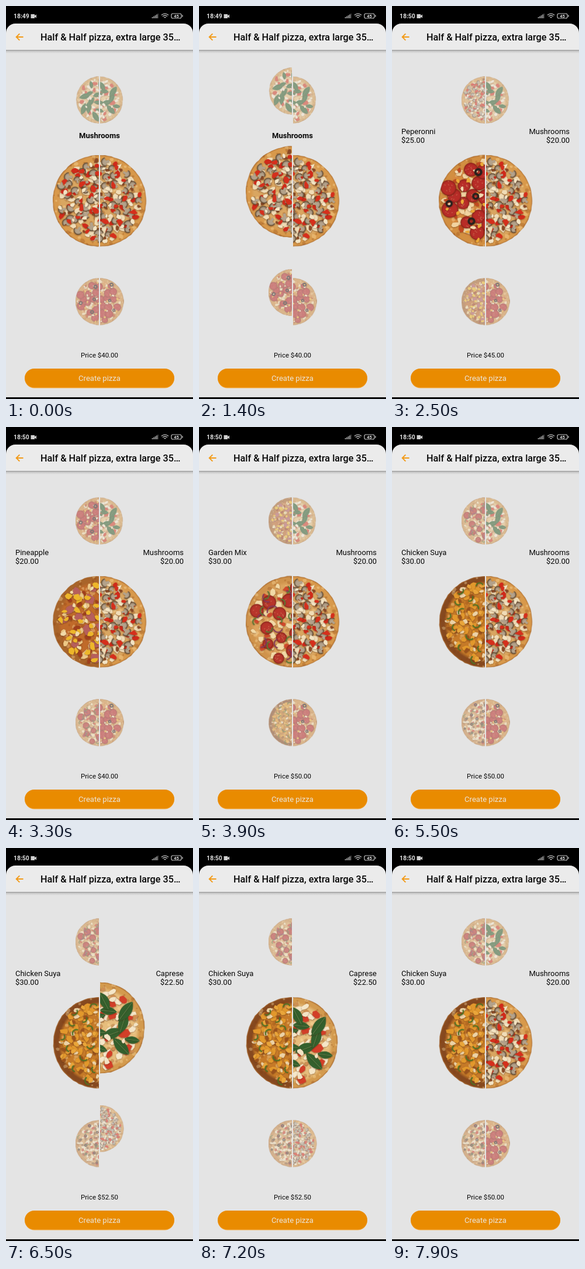
These frames come from a looping animation (320 by 672 pixels, 8000 ms). An HTML page with a canvas:

```html
<!DOCTYPE html>
<html lang="en">
<head>
<meta charset="utf-8">
<title>Half &amp; Half pizza</title>
<style>
  html, body { margin: 0; width: 100%; height: 100%; overflow: hidden; background: #e4e4e4; }
  canvas, svg { position: absolute; left: 0; top: 0; width: 320px; height: 672px; display: block; }
  text { font-family: Roboto, "Open Sans", sans-serif; fill: #050505; }
  .side { font-size: 13px; }
  .mid { text-anchor: middle; }
  .end { text-anchor: end; }
</style>
</head>
<body>
<canvas id="stage"></canvas>
<svg viewBox="0 0 320 672">
  <defs>
    <linearGradient id="shade" x1="0" y1="0" x2="0" y2="1">
      <stop offset="0" stop-color="#000" stop-opacity=".34"/>
      <stop offset=".4" stop-color="#000" stop-opacity=".12"/>
      <stop offset="1" stop-color="#000" stop-opacity="0"/>
    </linearGradient>
  </defs>

  <!-- status bar and header -->
  <rect y="75" width="320" height="6" fill="url(#shade)"/>
  <rect width="320" height="50" fill="#000"/>
  <path d="M0 75V46a16 16 0 0 1 16-16H304a16 16 0 0 1 16 16V75z" fill="#ebebeb"/>
  <text id="clock" x="13" y="21" font-size="10.4" font-weight="700" style="fill:#dedede"></text>
  <path d="M42.5 14h6.5v2.4l3-2v6.2l-3-2V21h-6.5z" fill="#d0d0d0"/>
  <g stroke="#c4c4c4" fill="none" stroke-width="1.4">
    <path d="M250.5 21v-2M253 21v-3.6M255.5 21v-5M258 21v-6.6"/>
    <path d="M260 21v-8" stroke="#555"/>
    <path d="M266 15.5q6-4.8 12 0M268 17.8q4-3.2 8 0M270.3 20q1.7-1.3 3.4 0"/>
    <rect x="283" y="13" width="17" height="8" rx="2.5" stroke-width="1.2"/>
    <path d="M302 15.5v3"/>
  </g>
  <text class="mid" x="291.5" y="20" font-size="7.5" font-weight="700" style="fill:#dedede">45</text>
  <path d="M29.5 53H18M23.3 47.3L17.6 53l5.7 5.7" fill="none" stroke="#f39a16" stroke-width="1.9"/>
  <text x="59" y="59" font-size="16.2" font-weight="500">Half &amp; Half pizza, extra large 35…</text>

  <!-- labels -->
  <text id="both" class="mid" x="160" y="226" font-size="13" font-weight="700"></text>
  <g id="pair" class="side">
    <text x="16" y="218.5"></text>
    <text x="16" y="234"></text>
    <text class="end" x="304" y="218.5"></text>
    <text class="end" x="304" y="234"></text>
  </g>
  <text id="price" class="mid" x="160" y="601" font-size="11.45"></text>

  <!-- button -->
  <rect x="32" y="620.5" width="256" height="33" rx="16.5" fill="#f5b04a"/>
  <rect x="32" y="620" width="256" height="32.5" rx="16.25" fill="#e98b00"/>
  <text class="mid" x="160" y="640.5" font-size="13.05" style="fill:#ebe6dc">Create pizza</text>
  <rect y="669" width="320" height="3" fill="#080808"/>
</svg>

<script>
const LOOP = 8000, TAU = Math.PI * 2;
const MID = 333, PAGE = 172.3, TOP = 75, BOTTOM = 592;
const $ = id => document.getElementById(id);

// Toppings: [shape, colour, count, size]
const MENU = [
  { name: 'Caprese', price: 22.5, rx: 77, crust: '#d39a4e', base: '#e6bd7c', top: [
    ['chunk', '#f5e6c8', 40, 19], ['chunk', '#d08f52', 22, 13], ['chunk', '#d23f28', 20, 20],
    ['leaf', '#34602d', 17, 36], ['chunk', '#f3e3c4', 14, 13]] },
  { name: 'Mushrooms', price: 20, rx: 80, crust: '#d8994b', base: '#d9a661', top: [
    ['chunk', '#f0dcb6', 55, 17], ['chunk', '#8a4a26', 36, 10], ['chunk', '#d02a1a', 34, 14],
    ['shroom', '#b3a28b', 58, 13], ['chunk', '#f3e4c4', 26, 10], ['chunk', '#d52f1c', 22, 13]] },
  { name: 'Peperonni', price: 25, rx: 80, crust: '#d28f41', base: '#d88a3e', top: [
    ['chunk', '#f1d3a0', 50, 17], ['chunk', '#c04a20', 34, 13], ['disc', '#b82c27', 24, 23],
    ['chunk', '#eda936', 22, 10], ['chunk', '#f3dab0', 14, 10], ['ring', '#29211e', 7, 9]] },
  { name: 'Pineapple', price: 20, rx: 80, crust: '#a8642a', base: '#c06a2a', top: [
    ['chunk', '#edc886', 50, 16], ['chunk', '#a03f1c', 34, 12], ['chunk', '#b65f5c', 24, 21],
    ['chunk', '#edb62a', 50, 14], ['chunk', '#f2dba8', 18, 10]] },
  { name: 'Garden Mix', price: 30, rx: 80, crust: '#cf934c', base: '#dda45e', top: [
    ['chunk', '#f2d9a6', 46, 17], ['chunk', '#d04a2c', 30, 13], ['disc', '#b8352b', 18, 20],
    ['arc', '#86395b', 18, 17], ['arc', '#5c7a35', 20, 15]] },
  { name: 'Chicken Suya', price: 30, rx: 79, crust: '#86491f', base: '#c67a28', top: [
    ['chunk', '#e2982c', 65, 17], ['chunk', '#9a521c', 34, 10], ['chunk', '#ecd2a6', 34, 11],
    ['chunk', '#e9a53a', 40, 12], ['arc', '#4f7424', 26, 12]] },
  { name: 'Olive Feast', price: 25, rx: 80, crust: '#c68746', base: '#d89f5c', top: [
    ['chunk', '#f2dfb8', 50, 17], ['chunk', '#cc4630', 38, 13], ['chunk', '#94663d', 28, 12],
    ['chunk', '#f2dfb8', 20, 10], ['ring', '#3a322c', 22, 7], ['arc', '#66803f', 12, 11]] }
];

// Swipes: [start ms, end ms, from page, to page]
const LEFT = [[1300, 1850, 1, 2], [2500, 2900, 2, 3], [3400, 3800, 3, 4], [3900, 4570, 4, 5]];
const RIGHT = [[6198, 6598, 1, 0], [7300, 7750, 0, 1]];

const smooth = u => { u = Math.min(1, Math.max(0, u)); return u * u * (3 - 2 * u); };
const money = n => '$' + n.toFixed(2);

function pageAt(swipes, t) {
  let page = swipes[0][2];
  for (const [a, b, from, to] of swipes) {
    if (t >= a) page = from + (to - from) * smooth((t - a) / (b - a));
  }
  return page;
}

function seeded(seed) {
  return () => {
    seed = seed * 1664525 + 1013904223 >>> 0;
    return seed / 4294967296;
  };
}

function blob(g, r, rnd, n, rough) {
  g.beginPath();
  for (let i = 0; i < n; i++) {
    const k = r * (1 - rough * rnd()), a = i / n * TAU;
    g.lineTo(Math.cos(a) * k, Math.sin(a) * k);
  }
  g.closePath();
}

const SHAPES = {
  chunk(g, r, rnd) {
    g.scale(1.15, .8);
    blob(g, r, rnd, 7, .5);
    g.fill();
  },
  disc(g, r, rnd) {
    g.beginPath();
    g.arc(0, 0, r, 0, TAU);
    g.fill();
    g.lineWidth = 2;
    g.strokeStyle = '#8f221c';
    g.stroke();
    g.fillStyle = 'rgba(240,150,110,.4)';
    for (let i = 0; i < 8; i++) {
      g.fillRect((rnd() - .5) * r * 1.2, (rnd() - .5) * r * 1.2, 5, 3);
    }
  },
  leaf(g, r) {
    g.beginPath();
    g.moveTo(-r, 0);
    g.quadraticCurveTo(-r * .1, -r * .95, r, 0);
    g.quadraticCurveTo(-r * .1, r * .85, -r, 0);
    g.fill();
    g.beginPath();
    g.moveTo(-r, 0);
    g.lineTo(r * .8, 0);
    g.lineWidth = 1.5;
    g.strokeStyle = '#6b8b55';
    g.stroke();
  },
  shroom(g, r) {
    g.beginPath();
    g.arc(0, 0, r, Math.PI, TAU);
    g.lineTo(r * .3, r * .1);
    g.lineTo(r * .3, r * .9);
    g.lineTo(-r * .3, r * .9);
    g.lineTo(-r * .3, r * .1);
    g.closePath();
    g.fill();
    g.beginPath();
    g.arc(0, 0, r, Math.PI, TAU);
    g.lineWidth = 3;
    g.strokeStyle = '#6b563d';
    g.stroke();
  },
  ring(g, r) {
    g.beginPath();
    g.arc(0, 0, r, 0, TAU);
    g.lineWidth = r * .75;
    g.stroke();
  },
  arc(g, r) {
    g.beginPath();
    g.arc(0, 0, r, 0, 2.6);
    g.lineWidth = 4;
    g.stroke();
  }
};

function bake(item, index) {
  const c = document.createElement('canvas'), g = c.getContext('2d');
  const rnd = seeded(index * 977 + 41);
  c.width = c.height = 320;
  g.translate(160, 160);
  g.scale(item.rx / 80, 1);
  blob(g, 160, rnd, 90, .012);
  g.clip();

  const dough = g.createRadialGradient(0, 0, 130, 0, 0, 160);
  dough.addColorStop(0, item.base);
  dough.addColorStop(.4, item.crust);
  dough.addColorStop(.8, item.crust);
  dough.addColorStop(1, '#a5662c');
  g.fillStyle = dough;
  g.fillRect(-160, -160, 320, 320);

  const scatter = (n, reach, draw) => {
    const turn = rnd() * TAU;
    for (let k = 0; k < n; k++) {
      const a = turn + k * 2.39996 + rnd() * .35;
      const d = reach * Math.sqrt((k + .2 + rnd() * .6) / n);
      g.save();
      g.translate(Math.cos(a) * d, Math.sin(a) * d);
      g.rotate(rnd() * TAU);
      draw();
      g.restore();
    }
  };

  // baked mottling
  scatter(190, 158, () => {
    g.fillStyle = rnd() < .5 ? 'rgba(255,225,165,.35)' : 'rgba(130,60,15,.26)';
    blob(g, 3 + rnd() * 8, rnd, 6, .5);
    g.fill();
  });
  for (const [shape, color, count, size] of item.top) {
    scatter(count, 148 - size * .6, () => {
      g.fillStyle = g.strokeStyle = color;
      g.shadowColor = 'rgba(70,30,8,.5)';
      g.shadowBlur = 4;
      g.shadowOffsetY = 1.5;
      SHAPES[shape](g, size * (.75 + rnd() * .45), rnd);
    });
  }
  return c;
}

const ratio = Math.max(1, window.devicePixelRatio || 1);
const stage = $('stage'), ctx = stage.getContext('2d');
stage.width = 320 * ratio;
stage.height = 672 * ratio;
const pies = MENU.map(bake);

function drawHalf(page, right) {
  pies.forEach((pie, i) => {
    const off = i - page, y = MID + off * PAGE;
    if (Math.abs(off) > 2) return;
    const big = smooth((.6 - Math.abs(off)) / .2);
    const w = 40.5 + 39 * big, h = 80.5 + 76.5 * big;
    ctx.globalAlpha = .55 + .45 * big;
    ctx.drawImage(pie, right ? 160 : 0, 0, 160, 320, right ? 161 : 159 - w, y - h / 2, w, h);
  });
}

function setText(el, value) {
  if (el.textContent !== value) el.textContent = value;
}

const pair = $('pair'), sides = [...pair.children];

function showLabels(l, r, t) {
  const same = l === r;
  pair.style.display = same ? 'none' : '';
  setText($('both'), same ? l.name : '');
  [l.name, money(l.price), r.name, money(r.price)].forEach((s, i) => setText(sides[i], s));
  setText($('price'), 'Price ' + money(l.price + r.price));
  setText($('clock'), t < 2000 ? '18:49' : '18:50');
}

function frame() {
  const t = performance.now() % LOOP;
  const left = pageAt(LEFT, t), right = pageAt(RIGHT, t);
  ctx.setTransform(ratio, 0, 0, ratio, 0, 0);
  ctx.imageSmoothingQuality = 'high';
  ctx.clearRect(0, 0, 320, 672);
  ctx.save();
  ctx.beginPath();
  ctx.rect(0, TOP, 320, BOTTOM - TOP);
  ctx.clip();
  drawHalf(left, false);
  drawHalf(right, true);
  ctx.restore();
  showLabels(MENU[Math.round(left)], MENU[Math.round(right)], t);
  requestAnimationFrame(frame);
}
frame();
</script>
</body>
</html>
```
